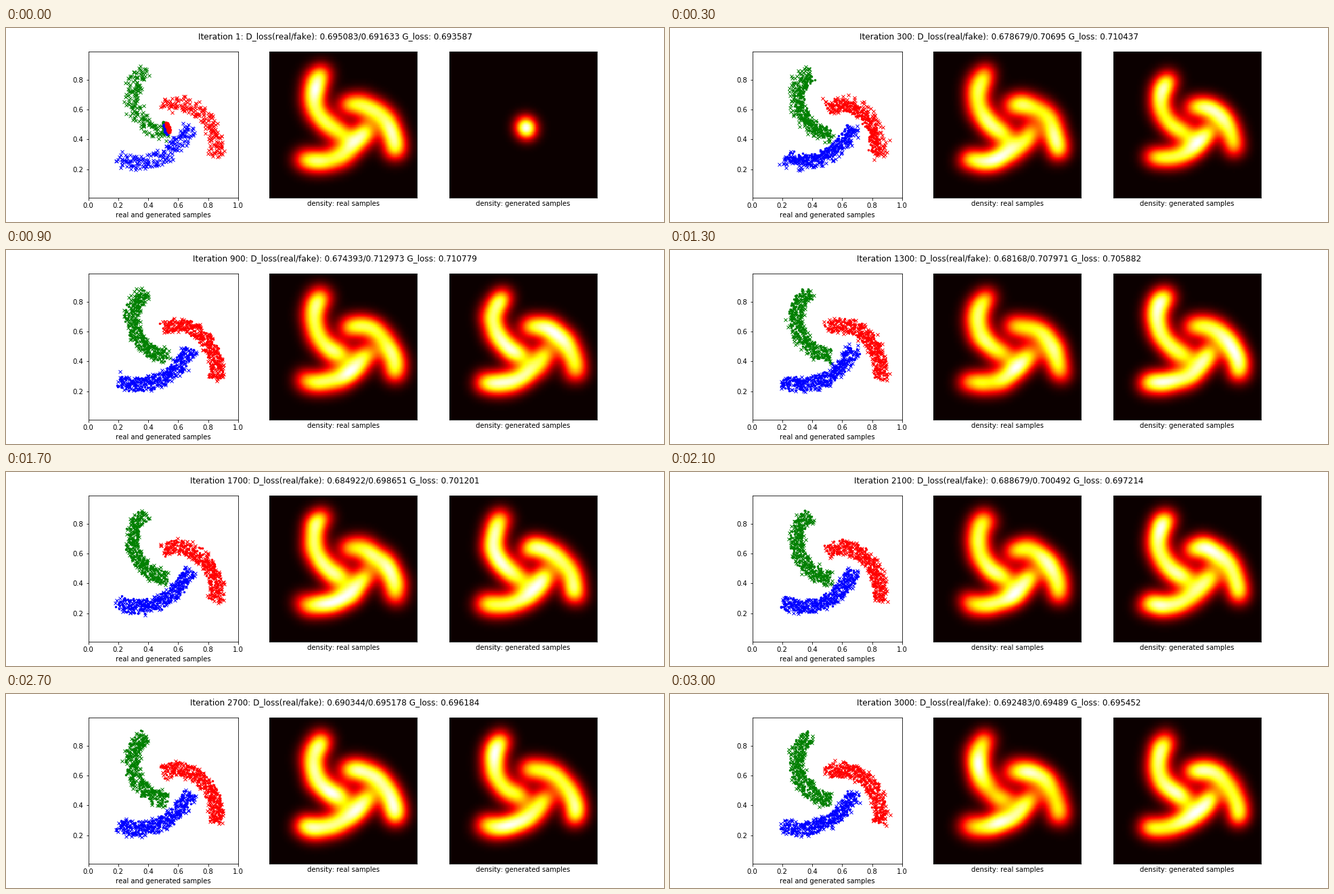
These frames come from a looping animation (972x288 px, 3.1 s). A matplotlib script:

```python
import math

import numpy as np
import matplotlib.pyplot as plt
from matplotlib.animation import FuncAnimation

plt.rcParams["font.family"] = "DejaVu Sans"
plt.rcParams["text.kerning_factor"] = 6

FRAMES, STEP_MS = 31, 100
PER_ARM = 200
BANDWIDTH = 0.05
HALF_WIDTH = 0.045

# Each spiral arm is one cubic Bezier curve; listed in draw order
ARMS = {
    "green": [(.385, .865), (.193, .758), (.313, .444), (.525, .44)],
    "blue": [(.2, .275), (.394, .186), (.601, .309), (.675, .49)],
    "red": [(.495, .62), (.706, .724), (.892, .476), (.845, .285)],
}
CLUMP = np.array([.52, .477])


def bezier(points, t):
    """Points and unit normals of a Bezier curve at the parameters t."""
    p0, p1, p2, p3 = np.array(points)
    t = t[:, None]
    s = 1 - t
    pos = s**3 * p0 + 3 * s * s * t * p1 + 3 * s * t * t * p2 + t**3 * p3
    vel = s * s * (p1 - p0) + 2 * s * t * (p2 - p1) + t * t * (p3 - p2)
    normal = vel[:, ::-1] * (-1, 1)
    return pos, normal / np.hypot(*vel.T)[:, None]


def sample_arm(rng, color, width, noise):
    """Points spread along the arm, with a slight crowding that varies."""
    t = (np.arange(PER_ARM) + rng.uniform(0, 1, PER_ARM)) / PER_ARM
    phase = rng.uniform(0, 2 * np.pi)
    t = t + .016 * (np.sin(2 * np.pi * t + phase) - np.sin(phase))
    pos, normal = bezier(ARMS[color], t)
    pos = pos + normal * rng.uniform(-width, width, (PER_ARM, 1))
    return pos + rng.normal(0, noise, pos.shape)


def generated_arm(rng, color, k):
    """Samples that spread from a tight clump to the arm as training goes on."""
    learned = 1 - math.exp(-(k / 2) ** 2)
    arm = sample_arm(rng, color, HALF_WIDTH * learned, .004)
    # The clump is a short slanted streak, each class leaning to its own arm
    u = rng.uniform(-1, 1, (PER_ARM, 1))
    lean = .05 * (arm.mean(axis=0) - CLUMP)
    clump = CLUMP + lean + u * (.009, -.03) + rng.normal(0, .004, arm.shape)
    return clump + learned * (arm - clump)


EDGES = np.linspace(0, 1, 100)
CENTRES = (EDGES[:-1] + EDGES[1:]) / 2


def density(pts):
    gx, gy = (np.exp(-((CENTRES[:, None] - c) / BANDWIDTH) ** 2 / 2)
              for c in pts.T)
    return gy @ gx.T


def caption(rng, k):
    """Losses sit near ln 2; their gap swells early on, then dies away."""
    gap = .018 * k / 6 * math.exp(1 - k / 6)
    real, fake, gen = (math.log(2) + gap * np.array([-1, 1, 1])
                       + rng.normal(0, .0015, 3))
    return (f"Iteration {100 * k or 1}: D_loss(real/fake): "
            f"{real:.6g}/{fake:.6g} G_loss: {gen:.6g}")


fig, (ax, ax_real, ax_gen) = plt.subplots(1, 3, figsize=(13.5, 4), dpi=72)
fig.subplots_adjust(left=.125, right=.9, bottom=.125, top=.88, wspace=.2)
title = fig.suptitle("", fontsize=12)

# Equal scale on both axes leaves slightly less than 0..1 in height
box = ax.get_position()
half = box.height * 4 / (box.width * 13.5) / 2
ax.set(xlim=(0, 1), ylim=(.5 - half, .5 + half),
       xticks=np.arange(6) / 5, yticks=np.arange(1, 5) / 5,
       xlabel="real and generated samples")
crosses = {c: ax.plot([], [], "x", color=c, ms=5)[0] for c in ARMS}
dots = {c: ax.plot([], [], ".", color=c, ms=5)[0] for c in ARMS}


def heat_map(axes, label):
    axes.set(aspect="equal", xticks=[], yticks=[], xlabel=label)
    blank = np.zeros((len(CENTRES),) * 2)
    mesh = axes.pcolormesh(EDGES, EDGES, blank, cmap="hot")
    axes.set(xlim=(0, 1), ylim=(0, 1))
    return mesh


real_map = heat_map(ax_real, "density: real samples")
gen_map = heat_map(ax_gen, "density: generated samples")


def show(lines, mesh, samples):
    for color, pts in samples.items():
        lines[color].set_data(*pts.T)
    values = density(np.vstack(list(samples.values())))
    mesh.set_array(values)
    mesh.set_clim(values.min(), values.max())


def update(k):
    rng = np.random.default_rng(100 + k)
    show(crosses, real_map,
         {c: sample_arm(rng, c, HALF_WIDTH, .01) for c in ARMS})
    show(dots, gen_map, {c: generated_arm(rng, c, k) for c in ARMS})
    title.set_text(caption(rng, k))
    return []


anim = FuncAnimation(fig, update, frames=FRAMES, interval=STEP_MS,
                     init_func=lambda: update(0), repeat=True, repeat_delay=0)
plt.show()
```
